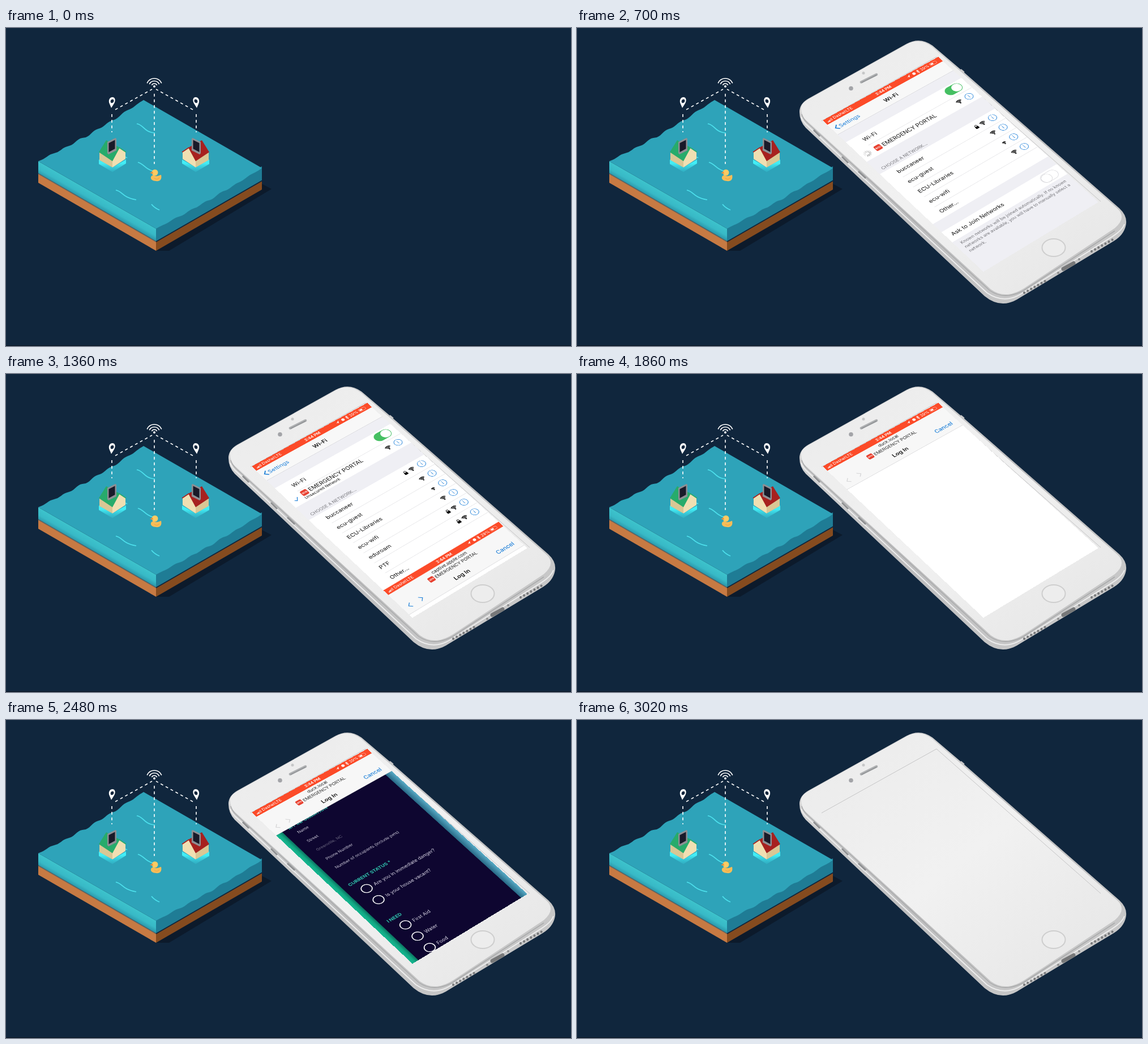
An HTML page for the animation above (3040 ms loop, 998 by 561 pixels).

```html
<!DOCTYPE html>
<html lang="en">
<head>
<meta charset="utf-8">
<title>Emergency portal</title>
<style>
  html, body { margin: 0; width: 100%; height: 100%; overflow: hidden; background: #10263d; }
  svg { display: block; }
  #scene { position: absolute; left: 0; top: 0; }
  #screen {
    position: absolute; left: 0; top: 0; width: 375px; height: 667px; overflow: hidden;
    transform-origin: 0 0;
    transform: matrix3d(.59019, -.29493, 0, .0000724, .39034, .37907, 0, -.00004936, 0, 0, 1, 0, 434, 163, 0, 1);
  }
  text { font-family: Inter, "Liberation Sans", sans-serif; white-space: pre; }
</style>
</head>
<body>
<svg id="scene" width="998" height="561" viewBox="0 0 998 561"></svg>
<div id="screen"></div>
<script>
const $ = id => document.getElementById(id);
const clamp = v => Math.max(0, Math.min(1, v));
const ramp = (t, from, to) => clamp((t - from) / (to - from));
const shape = (d, fill, extra = '') => `<path d="${d}" fill="${fill}" ${extra}/>`;
const line = (d, stroke, width, extra = '') =>
  `<path d="${d}" fill="none" stroke="${stroke}" stroke-width="${width}" ${extra}/>`;
const rect = (x, y, w, h, fill, extra = '') =>
  `<rect x="${x}" y="${y}" width="${w}" height="${h}" fill="${fill}" ${extra}/>`;
const gradient = (id, coords, ...stops) => `<linearGradient id="${id}" ${coords}>` +
  stops.map(([at, color, alpha = 1]) => `<stop offset="${at}" stop-color="${color}" stop-opacity="${alpha}"/>`).join('') +
  '</linearGradient>';

// Text placed by the middle of its capitals.
const label = (x, y, size, str, fill = '#111', extra = '') =>
  `<text x="${x}" y="${y + size * .36}" font-size="${size}" fill="${fill}" ${extra}>${str}</text>`;
const centered = 'text-anchor="middle"';

function wifi(x, y, radii, width, spread, color) {
  const arcs = radii.map(r => {
    const dx = r * Math.sin(spread), dy = -r * Math.cos(spread);
    return `M${x - dx} ${y + dy}A${r} ${r} 0 0 1 ${x + dx} ${y + dy}`;
  }).join('');
  return line(arcs, color, width) + `<circle cx="${x}" cy="${y}" r="2" fill="${color}"/>`;
}

// ---------- Island ----------
function ripple(x1, y1, x2, y2, amp, sag) {
  let d = '';
  for (let i = 0; i <= 60; i++) {
    const s = i / 60, bow = Math.sin(Math.PI * s);
    const off = sag * bow + amp * Math.sqrt(bow) * (Math.sin(s * 44) + .4 * Math.sin(s * 27 + 1));
    d += `L${(x1 + (x2 - x1) * s).toFixed(1)} ${(y1 + (y2 - y1) * s + off).toFixed(1)}`;
  }
  return d;
}

const house = roof => `
  ${shape('M164 232L188 246L212 232V239L188 254L164 240Z', 'url(#glow)')}
  ${shape('M165 219L188 233V246L165 233Z', '#d9c795')}
  ${shape('M188 234L200 211L211 218V231L188 246Z', '#f0dfb2')}
  ${shape('M164 219L177 198L201 211L188 235Z', roof)}
  ${line('M200 211L212 219', roof, 1.6)}
  ${shape('M179 201L193 194L195 195V216L181 223L179 221Z', '#8d8f94')}
  ${shape('M181.500 203L192.500 197.500V213L181.500 219Z', '#191a29')}`;

const pin = shape('M188 122C193 122 194 128 191 133L186 141L183 134C180 128 183 122 188 122ZM187.500 126A2.300 3.200 15 1 0 187.600 132A2.300 3.200 15 1 0 187.500 126Z', '#fff', 'fill-rule="evenodd"');
const side = (roof, flip) => `<g ${flip ? 'transform="translate(523 0) scale(-1 1)"' : ''}>
  ${house(roof)}${pin}${line('M187 152V184M193 144L258 108', '#fff', 1.6, 'stroke-dasharray="5 5"')}</g>`;

const island = `
  ${shape('M265 393H288L469 284L452 275Z', '#0c1a2b')}
  ${shape('M57 257L265 377V393L57 273Z', '#c77a43')}
  ${shape('M265 377L452 270V285L265 393Z', '#854b1f')}
  ${line('M57 257L265 377', '#6f675f', 1.5)}${line('M265 377L452 269.500', '#10263d', 2)}
  ${shape('M57 235L265 354V376L57 256Z', 'url(#water)')}
  ${shape('M265 350L452 244V268.500L265 376Z', '#1f7c95')}
  ${shape('M57 235' + ripple(57, 235, 243, 127, 1.5, 5) + 'L452 247' + ripple(452, 247, 265, 354, 1.1, 3) + 'Z', '#2ea3b9')}
  ${line('M231 169C243 170 243 184 263 185M233 237C243 239 247 250 259 252M194 286C206 288 205 299 230 303M257 311Q263 318 271 321M207 226L214 229', '#4ee2ee', 1.7)}
  ${side('#27ab6b')}${side('#a7211f', true)}
  ${line('M262 116V240', '#fff', 1.6, 'stroke-dasharray="5 5"')}
  ${wifi(262, 103, [5, 9.5, 14], 1.7, 1.15, '#fff')}
  ${shape('M256 263C257 260 260 260 260 259C265 263 269 261 274 259C276 268 271 271 265 270C259 270 255 267 256 263Z', '#f7bd58')}
  <circle cx="263" cy="255" r="5.500" fill="#fccb63"/>
  ${shape('M259 253L254 256L260 257Z', '#f0923a')}
  ${line('M262 265Q267 269 271 264', '#e9a443', 1)}`;

// ---------- Phone body ----------
let holes = '';
for (let i = 0; i < 7; i++) {
  for (const [x, y] of [[790, 467], [909, 394]])
    holes += `<ellipse cx="${x + i * 6.1}" cy="${y - i * 3.4}" rx="2" ry="2.200" fill="#77787a"/>`;
}
const body = `
  ${shape('M393 148Q393 134 408 125L582 28Q606 15 628 31L681 76L958 318Q973 332 969.500 348Q966 365 948 376L782 476Q750 497.500 720 473L404 176Q393 164 393 148Z', 'url(#edge)')}
  ${line('M396 157Q399 166 409 174L724 467Q753 487 783 470L947 367Q963 357 967 346', '#efefef', 1.8)}
  ${line('M397 152Q399 160 407 167.500L729 463Q755 481 788 463.500L950 358', '#aaabac', 1.5)}
  ${shape('M396 140Q396 133 410 125L584 28Q606 17 627 33L678 77L954 318Q972 334 950 353L790 459Q757 480 731 461L402 160Q395 150 396 140Z', 'url(#face)')}
  ${line('M418 180L429 191M468 227L479 238M497 253L510 265', '#8f9092', 3)}
  ${line('M678 73L684 78', '#c9c9c9', 2)}
  ${line('M432 164L635 51L925 306', '#c4c4c5', 1)}
  ${line('M502 95.500L529 82', '#aeb0b2', 4.5, 'stroke-linecap="round"')}
  ${line('M503 96L529 83', '#8f9194', 1.5, 'stroke-linecap="round"')}
  <circle cx="484" cy="106.500" r="3.800" fill="#a3a4a8"/><circle cx="506" cy="79.500" r="2.500" fill="#c6c7c8"/>
  <ellipse cx="842" cy="387.500" rx="20.500" ry="15.500" fill="#ededed" stroke="#cecece" stroke-width="2"/>
  ${holes}
  ${line('M859 425L877 415', '#777879', 7, 'stroke-linecap="round"')}
  <circle cx="850" cy="432" r="2" fill="#8d8e8f"/><circle cx="887" cy="408" r="2" fill="#8d8e8f"/>`;

$('scene').innerHTML = `<defs>
  ${gradient('water', 'gradientUnits="userSpaceOnUse" x1="161" y1="294.500" x2="151.600" y2="311"', [0, '#3dc3cc'], [.6, '#38b9c6'], [1, '#2b98ab'])}
  ${gradient('glow', 'x1="0" y1="0" x2="0" y2="1"', [.3, '#43eef6'], [1, '#35c4d4', .35])}
  ${gradient('edge', 'x1="0" y1="0" x2="1" y2="1"', [0, '#dcdcdc'], [.5, '#bdbdbe'], [1, '#cccccc'])}
  ${gradient('face', 'x1="0" y1="0" x2="1" y2="1"', [0, '#ebebeb'], [.5, '#f1f1f1'], [1, '#e5e5e5'])}
  </defs>
  ${rect(0, 0, 998, 561, '#10263d')}${rect(0, 560, 998, 1, '#08131f')}
  ${island}<g id="phone">${body}</g>`;

// ---------- Phone screen ----------
const BLUE = '#1b7ed8';
const sos = (x, y, s) => rect(x - s / 2, y - s / 2, s, s, '#e8402f', `rx="${s * .2}"`) +
  label(x, y, s * .4, 'SOS', '#fff', centered + ' font-weight="700"');

const statusBar = rect(0, 0, 375, 20, '#fc4b29') +
  [0, 1, 2, 3].map(i => rect(7 + i * 4, 12 - i * 2, 3, 3 + i * 2, '#fff', i > 1 ? 'opacity=".5"' : '')).join('') +
  label(26, 10, 12, 'Dashel', '#fff') + label(66, 10, 12, 'LTE', '#fff') +
  label(187, 10, 12, '3:44 PM', '#fff', centered + ' font-weight="600"') +
  shape('M265 11L275 5L270 15V11Z', '#fff') +
  '<circle cx="287" cy="10" r="4.500" fill="#fff"/>' +
  line('M297 7L303 13L300 16V4L303 7L297 13', '#fff', 1.2) +
  label(309, 10, 12, '29%', '#fff') +
  rect(340, 6, 20, 9, 'none', 'rx="2" stroke="#fff" opacity=".7"') + rect(342, 8, 8, 5, '#fff');

function signal(y, locked, weak) {
  return wifi(317, y + 5, weak ? [4, 7] : [4, 7.5, 11], 2.5, .8, '#111') +
    `<circle cx="349" cy="${y}" r="11" fill="none" stroke="${BLUE}" stroke-width="1.200"/>` +
    label(349, y, 15, 'i', BLUE, centered) +
    (locked ? rect(291, y - 1, 10, 8, '#111', 'rx="1"') + line(`M293 ${y}V${y - 3}a3 3 0 0 1 6 0V${y}`, '#111', 1.6) : '');
}
const rule = y => rect(39, y, 336, .7, '#cfced3');
const networks = names => rect(0, 242, 375, names.length * 44, '#fff') + names.map((entry, i) => {
  const [name, flags = ''] = entry.split('|');
  const y = 264 + i * 44;
  return label(39, y, 16.5, name) + (name === 'Other...' ? '' :
    signal(y, flags.includes('L'), flags.includes('w')) + rule(y + 22));
}).join('');

const known = ['buccaneer|L', 'ecu-guest', 'ECU-Libraries|w', 'ecu-wifi'];
const spokes = Array.from({ length: 12 }, (_, i) =>
  `<path d="M0-5V-10" stroke="#777" stroke-width="1.800" stroke-linecap="round" opacity="${.15 + i * .06}" transform="rotate(${i * 30})"/>`).join('');
const note = ['Known networks will be joined automatically. If no known',
  'networks are available, you will have to manually select a', 'network.'];

const settings = `${rect(0, 0, 375, 667, '#efeff4')}${rect(0, 20, 375, 44, '#f8f8f8')}${rect(0, 64, 375, .7, '#c5c5c9')}
  ${line('M18 34L9.500 42.500L18 51', BLUE, 2.8)}${label(21, 43, 16.5, 'Settings', BLUE)}
  ${label(187, 42, 16.5, 'Wi-Fi', '#111', centered + ' font-weight="600"')}
  ${rect(0, 99, 375, 88, '#fff')}${rule(143)}${label(39, 120, 16.5, 'Wi-Fi')}
  ${rect(308, 104, 51, 31, '#45bf62', 'rx="15.500"')}<circle cx="343.500" cy="119.500" r="14" fill="#fff"/>
  ${signal(165)}${label(15, 230, 12.6, 'CHOOSE A NETWORK...', '#77777c')}
  <g id="joining"><g id="spinner">${spokes}</g>${sos(53, 165, 19)}${label(67, 165, 16.6, 'EMERGENCY PORTAL')}
    ${networks([...known, 'Other...'])}
    ${rect(0, 497, 375, 44, '#fff')}${label(15, 519, 16.5, 'Ask to Join Networks')}
    ${rect(308, 503, 51, 31, '#fff', 'rx="15.500" stroke="#dcdce0" stroke-width="1.500"')}
    <circle cx="324" cy="519.500" r="14.500" fill="#fff" stroke="#c8c8cc"/>
    ${note.map((s, i) => label(15, 556 + i * 17, 12.7, s, '#77777c')).join('')}</g>
  <g id="joined">${line('M13 165L18 170L26 159', BLUE, 2)}${sos(50, 158, 19)}${label(64, 158, 16.6, 'EMERGENCY PORTAL')}
    ${label(39, 175, 11.8, 'Unsecured Network')}
    ${networks([...known, 'eduroam|L', 'PTF|L', 'Other...'])}</g>`;

const TEAL = '#2fc3ad';
const heading = (y, s) => label(38, y, 13.8, s, TEAL, 'font-weight="700"');
const choice = (y, s) => `<circle cx="67" cy="${y}" r="14" fill="none" stroke="#fff" stroke-width="2.500"/>` +
  label(90, y + 1, 14, s, '#d8d5e4');
const fields = ['Name', 'Street', 'Greenville, NC', 'Phone Number', 'Number of occupants (include pets)'];
const form = label(185, 116, 13.2, 'GULLNEST EMERGENCY PORTAL', '#2b7d89', centered) +
  label(184, 151.5, 12.4, 'Wolf: Potential threat that poses a danger to an', '#c08f3c', centered) +
  label(185, 170, 12.4, 'unknown degree', '#c08f3c', centered) +
  rect(47, 185, 276, 2.5, '#dddbe6') + heading(226, 'MY INFORMATION *') +
  fields.map((s, i) => label(49, 253 + i * 39.5, 12, s, i === 2 ? '#6c6880' : '#c9c6d6')).join('') +
  heading(480, 'CURRENT STATUS *') + choice(517, 'Are you in immediate danger?') + choice(566, 'Is your house vacant?') +
  heading(639, 'I NEED') + ['First Aid', 'Water', 'Food', 'Shelter'].map((s, i) => choice(676 + i * 49, s)).join('');

const portal = `${rect(0, 0, 375, 667, '#fff')}
  <g id="page" clip-path="url(#below)">${rect(0, 104, 375, 563, 'url(#strip)')}${rect(19, 104, 335, 563, '#0e0630')}
    <g id="form">${form}</g></g>
  ${rect(0, 0, 375, 104, '#f7f7f7')}${rect(0, 104, 375, .8, '#c3c3c6')}${statusBar}
  <text id="address" x="187" y="35" font-size="13" fill="#222" text-anchor="middle"></text>
  ${sos(117, 47, 17)}${label(129, 48, 13, 'EMERGENCY PORTAL', '#222')}
  <g id="arrows">${line('M25 73L17 81L25 89M53 73L61 81L53 89', 'currentColor', 1.8)}</g>
  ${label(187, 82, 16.5, 'Log In', '#111', centered + ' font-weight="600"')}
  ${label(358, 81, 16.8, 'Cancel', BLUE, 'text-anchor="end" font-weight="500"')}`;

$('screen').innerHTML = `<svg width="375" height="667" viewBox="0 0 375 667"><defs>
  <clipPath id="below">${rect(0, 104, 375, 563, '#000')}</clipPath>
  ${gradient('strip', 'x1="0" y1="0" x2="1" y2="0"', [0, '#17b791'], [.025, '#12a883'], [.055, '#0a6659'], [.94, '#23627f'], [1, '#58abc6'])}
  </defs>${settings}${statusBar}<g id="portal">${portal}</g></svg>`;

// ---------- Timeline ----------
const LOOP = 3040, STEP = 20;
const show = (id, on) => $(id).style.display = on ? '' : 'none';

function render(t) {
  $('phone').style.opacity = ramp(t, 0, 340);
  $('screen').style.opacity = ramp(t, 340, 560) * (1 - ramp(t, 2780, 3000));

  show('joining', t < 980);
  show('joined', t >= 980);
  $('spinner').setAttribute('transform', `translate(19 165) rotate(${Math.floor(t / 80) * 30})`);

  const rise = 1 - (1 - ramp(t, 1340, 1660)) ** 3;
  show('portal', t >= 1340);
  $('portal').setAttribute('transform', `translate(0 ${667 * (1 - rise)})`);
  const local = t >= 1700;
  $('address').textContent = local ? 'duck.local' : 'captive.apple.com';
  $('arrows').style.color = local ? '#d4d4d6' : BLUE;

  show('page', t >= 1960);
  const scroll = (Math.min(Math.max(t, 2040), 2600) - 2160) * 122 / 320;
  $('form').setAttribute('transform', `translate(0 ${-scroll})`);
}

const start = performance.now();
function tick() {
  const elapsed = (performance.now() - start) % LOOP;
  render(Math.floor(elapsed / STEP) * STEP);
  requestAnimationFrame(tick);
}
render(0);
requestAnimationFrame(tick);
</script>
</body>
</html>
```
